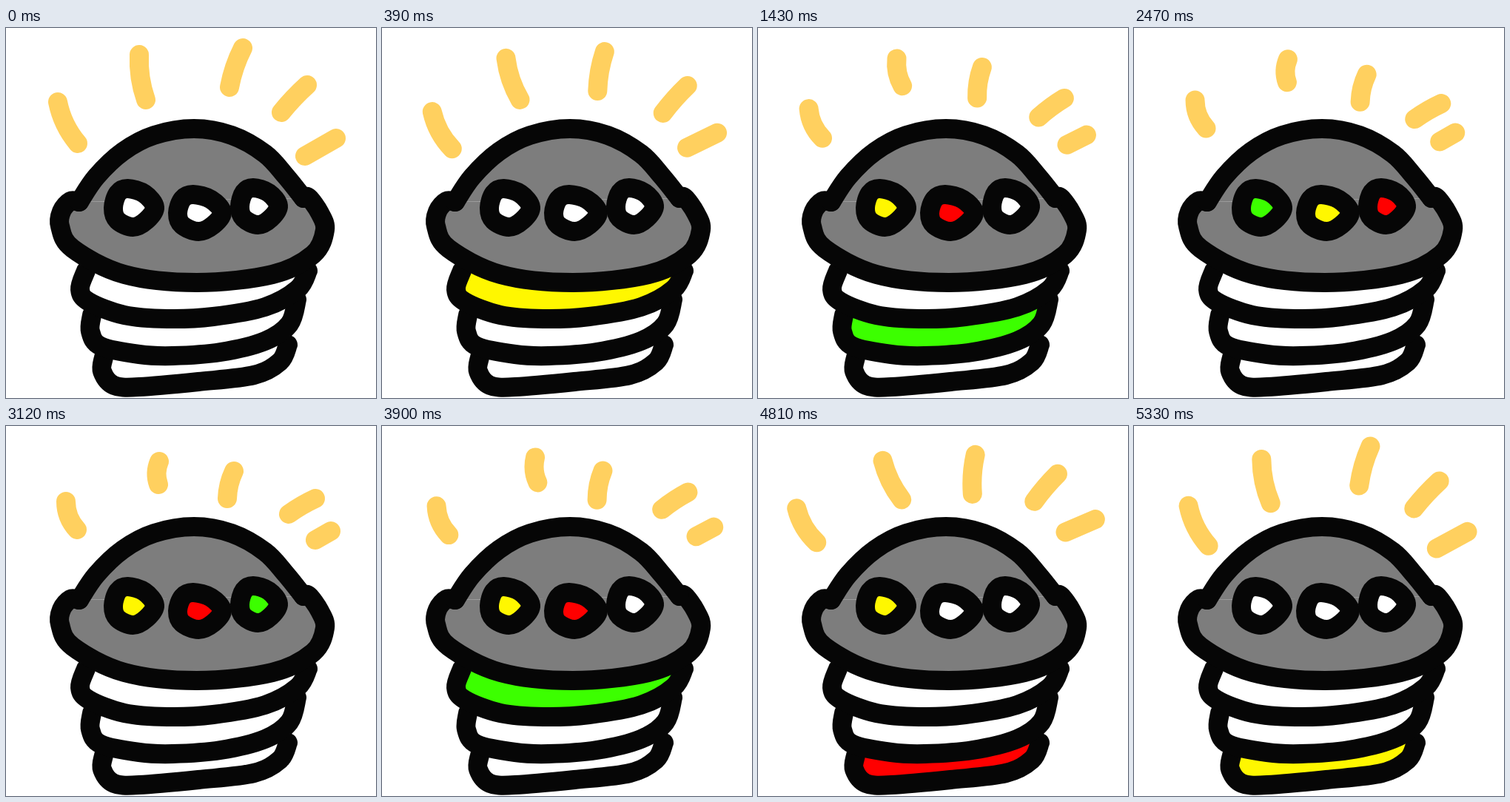
Recreate the animation shown at these times as an HTML page. Size 500 by 500 pixels, loop 5460 ms.

```html
<!DOCTYPE html>
<html lang="en">
<head>
<meta charset="utf-8">
<title>Glowing dome</title>
<style>
  html, body { margin: 0; width: 100%; height: 100%; overflow: hidden; background: #fff; }
  svg { display: block; width: 100%; height: 100%; stroke-linecap: round; stroke-linejoin: round; }
</style>
</head>
<body>
<svg id="stage" viewBox="0 0 500 500"></svg>
<script>
const STEP_MS = 130, STEPS = 42, HOLD_FROM = 13, HOLD_TO = 18;
const PEN = 26, INK = '#060606', GREY = '#7d7d7d', RAY = '#ffd05f', WHITE = '#fff';
const COLORS = ['#fff700', '#ff0000', '#3cff00'];
const ENTRY = [1, 5, 10]; // step at which each colour enters the bottom band

const stage = document.getElementById('stage');

function addPath(d, fill, stroke) {
  const el = document.createElementNS('http://www.w3.org/2000/svg', 'path');
  Object.entries({ d, fill, stroke, 'stroke-width': PEN }).forEach(([k, v]) => el.setAttribute(k, v));
  return stage.appendChild(el);
}

// Smooth curve through points, drawn with the thick pen
function outline(fill, points, closed = false) {
  const n = points.length;
  const at = i => closed ? points[(i + n) % n] : points[Math.min(Math.max(i, 0), n - 1)];
  let d = 'M' + at(0);
  for (let i = 0; i < (closed ? n : n - 1); i++) {
    const [a, b, c, e] = [at(i - 1), at(i), at(i + 1), at(i + 2)];
    const c1 = b.map((v, k) => v + (c[k] - a[k]) / 6);
    const c2 = c.map((v, k) => v - (e[k] - b[k]) / 6);
    d += `C${c1} ${c2} ${c}`;
  }
  return addPath(closed ? d + 'Z' : d, fill, INK);
}

// Bottom, middle, top: each one overlaps the band below it
const bands = [
  [[132, 445], [130, 464], [146, 483], [180, 485], [260, 478], [335, 469], [370, 451], [381, 428]],
  [[116, 388], [114, 410], [128, 430], [180, 441], [225, 443], [290, 438], [350, 423], [383, 400], [393, 367]],
  [[108, 328], [100, 353], [112, 370], [160, 388], [218, 393], [280, 390], [350, 377], [394, 353], [408, 328]],
].map(points => outline(WHITE, points));

// Brim, then dome
outline(GREY, [[99, 235], [87, 234], [75, 248], [73, 268], [90, 298], [160, 333], [258, 344], [360, 333],
  [415, 306], [431, 273], [424, 250], [409, 229], [402, 230]]);
outline(GREY, [[99, 235], [122, 201], [158, 167], [200, 145], [254, 136], [305, 145], [350, 170],
  [378, 200], [402, 230]]);

const EYE = [[-.3, -1], [.5, -.73], [1, -.03], [.6, .65], [-.06, 1], [-.8, .65], [-1, 0], [-.78, -.76]];
const lights = [[173, 243, 28, 26], [262, 250, 30, 25], [342, 241, 26, 25]].map(([x, y, rx, ry]) =>
  outline(WHITE, EYE.map(([u, v]) => [x + u * rx, y + v * ry]), true));

// Key poses of the five rays: outer end, inner end
const POSES = {
  0: [[70, 100, 97, 156], [180, 36, 189, 97], [320, 27, 302, 80], [407, 77, 372, 114], [446, 149, 404, 173]],
  6: [[52, 120, 79, 164], [161, 48, 190, 99], [290, 35, 289, 88], [405, 67, 374, 104], [461, 127, 421, 143]],
  13: [[81, 102, 96, 140], [207, 48, 206, 79], [308, 61, 299, 98], [418, 98, 382, 119], [439, 142, 418, 154]],
};
const KEYS = Object.keys(POSES).map(Number);
const rays = addPath('', 'none', RAY);

// Repeatable random number from -1 to 1
function noise(seed) {
  const x = Math.sin(seed * 12.9898) * 43758.5453;
  return 2 * (x - Math.floor(x)) - 1;
}

function rayPath([x1, y1, x2, y2], bend) {
  const dx = x2 - x1, dy = y2 - y1, len = Math.hypot(dx, dy);
  const cx = (x1 + x2) / 2 - dy / len * bend, cy = (y1 + y2) / 2 + dx / len * bend;
  return `M${x1} ${y1}Q${cx} ${cy} ${x2} ${y2}`;
}

// Rays drift from pose to pose and jitter in between
function raysAt(k) {
  const from = KEYS.filter(s => s <= k).pop();
  const to = KEYS.find(s => s >= k) ?? from;
  const mix = to > from ? (k - from) / (to - from) : 0;
  const jitter = KEYS.includes(k) ? 0 : 7;
  return POSES[from].map((ray, i) => rayPath(
    ray.map((v, j) => v + (POSES[to][i][j] - v) * mix + jitter * noise(k * 10 + i * 2 + j % 2)),
    8 - 2 * i)).join('');
}

function draw(step) {
  // The second half plays the first half backwards
  let k = Math.min(step, STEPS - step);
  if (k >= HOLD_FROM && k <= HOLD_TO) k = HOLD_FROM;
  const turn = Math.max(0, k - HOLD_TO);
  const bandFill = bands.map(() => WHITE), lightFill = lights.map(() => WHITE);
  COLORS.forEach((color, i) => {
    const age = k - ENTRY[i];
    if (age >= bands.length) lightFill[(i + turn) % 3] = color;
    else if (age >= 0) bandFill[age] = color;
  });
  bands.forEach((el, i) => el.setAttribute('fill', bandFill[i]));
  lights.forEach((el, i) => el.setAttribute('fill', lightFill[i]));
  rays.setAttribute('d', raysAt(k));
}

const start = performance.now();
function tick() {
  draw(Math.floor((performance.now() - start) / STEP_MS) % STEPS);
  requestAnimationFrame(tick);
}
tick();
</script>
</body>
</html>
```
